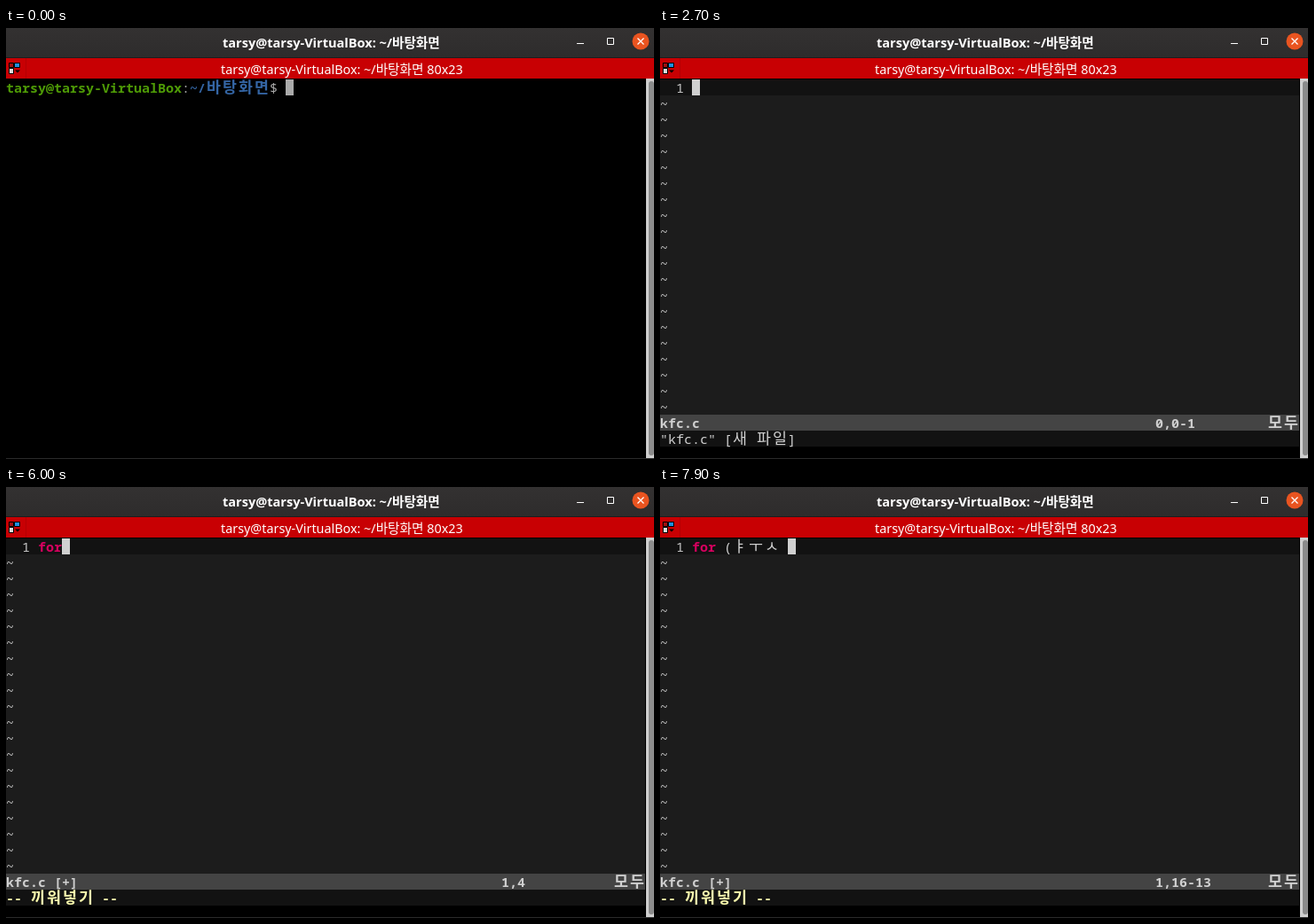
Write an HTML page that moves like this. It is 730 px wide and 486 px high and loops after 8 s.

```html
<!DOCTYPE html>
<html lang="ko">
<head>
<meta charset="utf-8">
<title>Terminal</title>
<style>
  html, body { margin: 0; width: 100%; height: 100%; overflow: hidden; background: #000; }
  svg { display: block; }
  text { white-space: pre; }
  .bar { font: 14.35px "Noto Sans", "Open Sans", "Noto Sans CJK KR", "Noto Sans CJK", sans-serif; fill: #fff; }
  .bar.b { font-size: 14.55px; }
  .bar .ko { font-size: 14.67px; }
  .mono { font: 15px "Noto Sans Mono", monospace; }
  .ko { font-family: "Noto Sans CJK KR", "Noto Sans CJK", sans-serif; }
  .mono.ko { font-size: 17.33px; }
  .b { font-weight: 700; }
  .fg { fill: #aaa; }
  .user { fill: #4e9a06; }
  .path { fill: #3465a4; }
  .code { fill: #d0d0d0; }
  .num { fill: #c6c6c6; }
  .key { fill: #d7005f; }
  .mode { fill: #ffffaf; }
  .pre { fill: #fff; }
</style>
</head>
<body>
<svg width="730" height="486" viewBox="0 0 730 486">
  <defs>
    <linearGradient id="head" x2="0" y2="1">
      <stop stop-color="#333131"/>
      <stop offset="1" stop-color="#2e2c2c"/>
    </linearGradient>
  </defs>
  <rect width="730" height="486"/>

  <rect width="730" height="34" fill="url(#head)"/>
  <rect y="33" width="730" height="1" fill="#1f1d1d"/>
  <text class="bar b" x="244" y="22">tarsy@tarsy-VirtualBox: ~/<tspan class="ko">바탕화면</tspan></text>
  <g fill="none" stroke="#fff">
    <path d="M643 17.5h8"/>
    <path d="M677.5 11.5h7v7h-7z"/>
    <circle cx="715" cy="15" r="9.5" fill="#e95420" stroke="none"/>
    <path d="M711.5 11.5l7 7m0-7l-7 7" stroke-width="1.3"/>
  </g>

  <rect y="34" width="730" height="23" fill="#c80003"/>
  <rect x="22" y="34" width="1" height="23" fill="#b40003"/>
  <text class="bar" x="242" y="52">tarsy@tarsy-VirtualBox: ~/<tspan class="ko">바탕화면</tspan> 80x23</text>
  <g stroke="#000">
    <path d="M3.5 39.5h5v5h-5z" fill="#a01010"/>
    <path d="M9.5 39.5h6v5h-6z" fill="#1e90e0"/>
    <path d="M3.5 45.5h5v6h-5z" fill="#ddd"/>
    <path d="M10 47.5h6l-3 3z" stroke="none"/>
  </g>

  <rect x="721" y="57" width="9" height="428" fill="#cfcfcf"/>
  <rect x="724" y="60" width="6" height="422" rx="3" fill="#8a8a8a"/>
  <rect y="485" width="730" height="1" fill="#2a2a2a"/>
  <g id="screen"></g>
</svg>
<script>
const CW = 9, CH = 18, TOP = 58, LOOP = 8000, VIM_AT = 2700, INSERT_AT = 3700, EDIT_AT = 4300;
const screen = document.getElementById('screen');

// Each step: start time, typed text, and 1 = cursor, 0 = hidden cursor, or a syllable being composed.
const steps = [
  [0, '', 1], [1400, 'v', 1], [1600, 'vi', 1], [1700, 'vim ', 1],
  [1900, 'vim k', 1], [2000, 'vim kf', 1], [2200, 'vim kfc', 1], [2300, 'vim kfc.c', 1],
  [2700, '', 1], [3200, '', 0], [3700, '', 1],
  [4300, 'f', 1], [4400, 'fo', 1], [4500, 'for', 1],
  [5000, 'for', 0], [5100, 'for', 1], [5500, 'for(', 1],
  [6000, 'for', 1], [6100, 'for ', 1], [6200, 'for (', 1],
  [6400, 'for (', 'ㅜ'], [6500, 'for (ㅑ', 'ㅜ'], [6600, 'for (ㅑㅜ', 'ㅅ'],
  [6700, 'for (ㅑㅜㅅ ', 1], [6800, 'for (ㅑㅜㅅ ', 'ㅑ'], [6900, 'for (ㅑㅜㅅ ㅑ =', 1],
  [7200, 'for (ㅑㅜㅅ ㅑ = ', 1], [7500, 'for (ㅑㅜㅅ ㅑ =', 1],
  [7700, 'for (ㅑㅜㅅ ㅑ ', 1], [7800, 'for (ㅑㅜㅅ ㅑ', 1], [7900, 'for (ㅑㅜㅅ ', 1]
];

const isWide = ch => ch > '\x7f';
const cells = s => [...s].reduce((n, ch) => n + (isWide(ch) ? 2 : 1), 0);
const bytes = s => new TextEncoder().encode(s).length;

function add(tag, attrs, text = '') {
  const el = document.createElementNS('http://www.w3.org/2000/svg', tag);
  for (const name in attrs) el.setAttribute(name, attrs[name]);
  el.textContent = text;
  screen.append(el);
}

function block(col, row, w, fill, h = 1) {
  add('rect', { x: col * CW, y: TOP + row * CH, width: w * CW, height: h * CH, fill });
}

// Writes text on the character grid and returns the column after it.
function put(text, col, row, cls) {
  for (const run of text.match(/[\x20-\x7e]+|[^\x20-\x7e]+/g) || []) {
    const wide = isWide(run[0]), step = wide ? 2 : 1;
    const x = [...run].map((_, i) => (col + i * step) * CW + (wide ? 1 : 0));
    add('text', { x: x.join(' '), y: TOP + row * CH + 15, class: `mono ${cls}${wide ? ' ko' : ''}` }, run);
    col += run.length * step;
  }
  return col;
}

function drawShell(text) {
  let col = put('tarsy@tarsy-VirtualBox', 0, 0, 'b user');
  col = put(':', col, 0, 'fg');
  col = put('~/바탕화면', col, 0, 'b path');
  col = put('$ ' + text, col, 0, 'fg');
  block(col, 0, 1, '#aaa');
}

function drawVim(time, text, mark) {
  block(0, 0, 80, '#121212');
  block(0, 1, 80, '#1c1c1c', 20);
  block(0, 21, 80, '#444');
  block(0, 22, 80, '#121212');

  put('1', 2, 0, 'num');
  for (let row = 1; row <= 20; row++) put('~', 0, row, 'num');

  const hasKey = text.startsWith('for');
  let col = put(hasKey ? 'for' : '', 4, 0, 'b key');
  col = put(hasKey ? text.slice(3) : text, col, 0, 'code');
  if (mark === 1) block(col, 0, 1, '#d0d0d0');
  else if (mark) {
    block(col, 0, 2, '#000');
    put(mark, col, 0, 'pre');
  }

  const insert = time >= INSERT_AT;
  const b = bytes(text) + 1, c = cells(text) + 1;
  const pos = text ? '1,' + (b === c ? b : `${b}-${c}`) : insert ? '0,1' : '0,0-1';
  put(time >= EDIT_AT ? 'kfc.c [+]' : 'kfc.c', 0, 21, 'b code');
  put(pos, 62, 21, 'b code');
  put('모두', 76, 21, 'b code');
  if (insert) put('-- 끼워넣기 --', 0, 22, 'b mode');
  else put('"kfc.c" [새 파일]', 0, 22, 'code');
}

let shown;
function frame() {
  const now = performance.now() % LOOP;
  const step = steps.findLast(s => s[0] <= now);
  if (step !== shown) {
    shown = step;
    screen.replaceChildren();
    const [time, text, mark] = step;
    if (time < VIM_AT) drawShell(text);
    else drawVim(time, text, mark);
  }
  requestAnimationFrame(frame);
}
frame();
</script>
</body>
</html>
```
